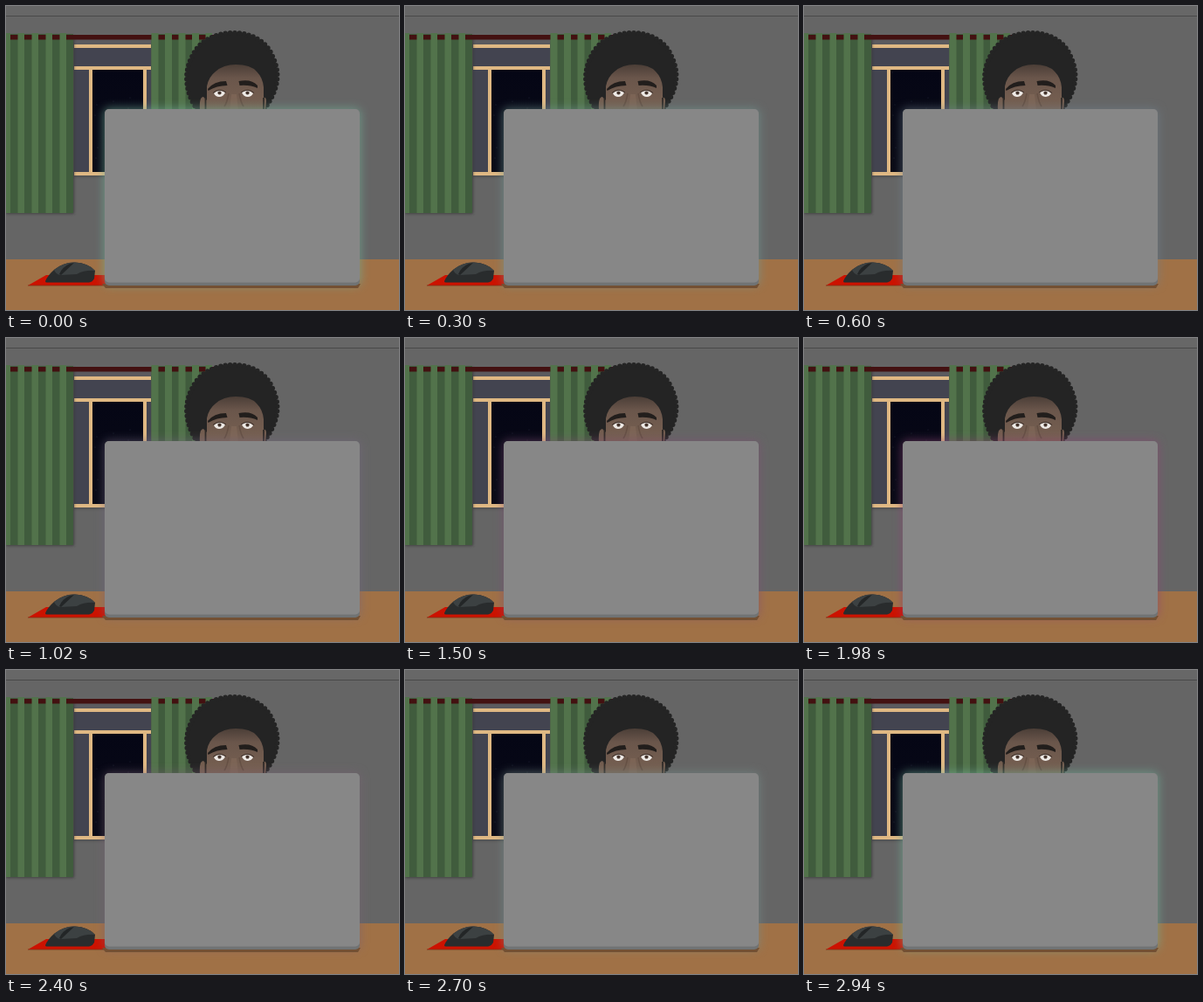
An HTML page for the animation above (3 s loop, 450 by 348 pixels).

```html
<!DOCTYPE html>
<html lang="en">
<head>
<meta charset="utf-8">
<title>Late night at the laptop</title>
<style>
html, body { margin: 0; width: 100%; height: 100%; overflow: hidden; background: #656565; }
svg { display: block; width: 100vw; height: 100vh; }
</style>
</head>
<body>
<svg viewBox="0 0 450 348">
  <defs>
    <linearGradient id="skin" x2="0" y2="1">
      <stop offset="0" stop-color="#4b3e37"/>
      <stop offset=".3" stop-color="#6a564b"/>
      <stop offset="1" stop-color="#786152"/>
    </linearGradient>
    <linearGradient id="night" x2="0" y2="1">
      <stop offset="0" stop-color="#050615"/>
      <stop offset="1" stop-color="#090a16"/>
    </linearGradient>
    <filter id="soft" x="-20%" y="-20%" width="140%" height="140%"><feGaussianBlur stdDeviation="1.8"/></filter>
    <filter id="blur" x="-10%" y="-10%" width="120%" height="120%"><feGaussianBlur stdDeviation="5.2"/></filter>
  </defs>

  <rect width="450" height="348" fill="#656565"/>
  <rect width="450" height="11" fill="#676767"/>
  <path d="M0 11.5H450" stroke="#494949"/>
  <rect y="290" width="450" height="58" fill="#a07146"/>

  <!-- window -->
  <rect x="77" y="40" width="90" height="156" fill="#444" opacity=".6" filter="url(#soft)"/>
  <rect x="78" y="38" width="88" height="6" fill="#5b5a5e"/>
  <rect x="78" y="46" width="88" height="146" fill="#434450"/>
  <rect x="98" y="72" width="60" height="119" fill="url(#night)"/>
  <g id="stars" fill="#555b70"></g>
  <path d="M78 46H166M78 71H166M78 192H166M97 71V192M159 71V192" fill="none" stroke="#dfb883" stroke-width="4"/>

  <!-- curtains: dark folds pass behind the rod, light ones in front -->
  <rect y="34" width="78" height="204" fill="#333" opacity=".7" filter="url(#soft)"/>
  <path d="M0 134.500H77M166.500 134.500H236" stroke="#405c3d" stroke-width="205"/>
  <rect y="33" width="240" height="5.500" fill="#431111"/>
  <g stroke="#52734b" stroke-width="206" fill="none">
    <path d="M0 134H77" stroke-dasharray="7.500 8.500" stroke-dashoffset="2.500"/>
    <path d="M166.500 134H236" stroke-dasharray="8 7.500"/>
  </g>

  <!-- head -->
  <g>
    <path d="M219 119C206 101 202 76 214 56C228 24 290 20 305 57C315 77 312 97 295 119Z" fill="#242424"/>
    <path d="M219 119C206 101 202 76 214 56C228 24 290 20 305 57C315 77 312 97 295 119" fill="none" stroke="#242424" stroke-width="5.500" stroke-linecap="round" stroke-dasharray="0 5.400"/>
    <path d="M222 119Q221 104 226 104L230 108V92Q232 81 240 75Q249 67 263 67Q280 67 287 75Q294 82 295 93V105Q298 104 298 109L297 119Z" fill="url(#skin)"/>
    <path d="M228.500 105V119M295 105V119" stroke="#302a27" stroke-width="1.800"/>
    <path d="M231 95Q238 86 252 86L253.500 91Q241 91 231.500 97ZM266.500 86Q281 83 288 91L288 94Q279 90 267.500 91Z" fill="#221e1c"/>
    <path d="M238 100Q244 94 251 99Q249 104 244 104Q240 104 238 100ZM270 99Q277 94 283 100Q281 104 277 104Q272 104 270 99Z" fill="#eeeae6"/>
    <path d="M237 99.500Q244 93.500 252 99M269 99Q277 93.500 284 99.500" fill="none" stroke="#3a2d27" stroke-width="1"/>
    <circle cx="244.500" cy="99.500" r="2.100" fill="#45352d"/>
    <circle cx="276.500" cy="99.500" r="2.100" fill="#45352d"/>
    <path d="M255 100Q253 111 250 115M267 100Q269 111 272 115" fill="none" stroke="#655044" stroke-width="1.500"/>
    <path d="M258 101H264L266 119H256Z" fill="#806858" opacity=".7"/>
  </g>

  <!-- mouse and pad -->
  <path d="M25 320L46 308H116V320Z" fill="#cc1200"/>
  <path d="M25 320H114" stroke="#7c351d" stroke-width=".8"/>
  <path d="M45 315Q48 308 55 302Q66 293 79 293.500Q94 294 102 303L101 312Q99 316 95 316.500H48Q45 317 45 315Z" fill="#292c2d"/>
  <path d="M55 302Q66 293 79 293.500Q94 294 102 303Q90 302 81 307L62 308Q57 307 55 302Z" fill="#3c4142"/>
  <path d="M63 308L78 294L73 295Q64 299 61 307Z" fill="#232627"/>

  <!-- laptop -->
  <rect id="glow" x="112" y="117" width="294" height="203" rx="6" filter="url(#blur)"/>
  <path d="M110 318H406L403 323H114Z" fill="#735033"/>
  <rect x="113" y="118" width="292" height="202" rx="5" fill="#707374"/>
  <rect x="113" y="118" width="292" height="198.500" rx="5" fill="#878787"/>
</svg>
<script>
const glow = document.getElementById('glow');
const LOOP = 3000, STEP = 60;

// time, red, green, blue, opacity of the screen light
const keys = [
  [0, 112, 172, 150, .66],
  [600, 112, 130, 142, .55],
  [1020, 118, 104, 128, .52],
  [1500, 128, 80, 118, .55],
  [1980, 140, 70, 118, .6],
  [2400, 122, 98, 118, .52],
  [2940, 112, 172, 150, .66],
  [3000, 112, 172, 150, .66]
];

let stars = '';
for (let i = 0; i < 14; i++) {
  const x = 101 + i * 37 % 55, y = 76 + i * 53 % 110;
  stars += `<circle cx="${x}" cy="${y}" r=".5" opacity=".45"/>`;
}
document.getElementById('stars').innerHTML = stars;

function draw(now) {
  const t = Math.floor(now % LOOP / STEP) * STEP;
  const i = keys.findIndex(k => k[0] > t);
  const a = keys[i - 1], b = keys[i];
  const p = (t - a[0]) / (b[0] - a[0]);
  const [, r, g, bl, alpha] = a.map((v, j) => v + (b[j] - v) * p);
  glow.setAttribute('fill', `rgb(${r},${g},${bl})`);
  glow.setAttribute('opacity', alpha);
}

function tick() {
  draw(performance.now());
  requestAnimationFrame(tick);
}
tick();
</script>
</body>
</html>
```
